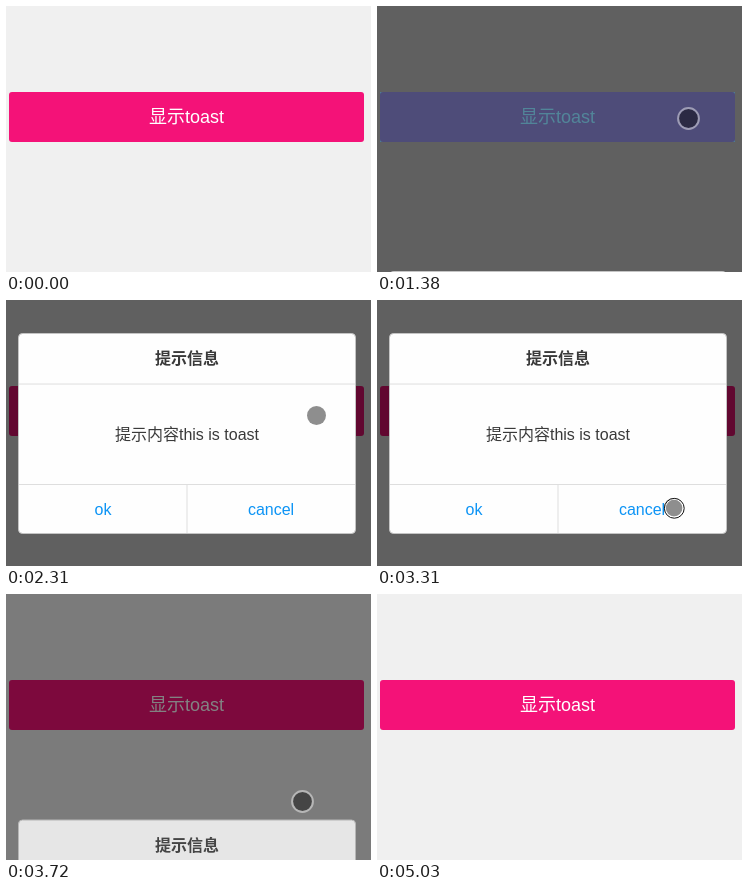
Animation, 365 px wide and 266 px high, one loop 5460 ms. Source, as an HTML page:

```html
<!DOCTYPE html>
<html lang="zh-CN">
<head>
<meta charset="utf-8">
<style>
  html, body { margin: 0; width: 100%; height: 100%; overflow: hidden; background: #f0f0f0; }
  svg { display: block; width: 365px; height: 266px; }
  text { font: 16px "Liberation Sans", "Noto Sans CJK SC", "Noto Sans CJK", sans-serif; text-anchor: middle; fill: #3a3a3a; }
  .label { font-size: 18px; fill: #fff; }
  .title { font-weight: 700; }
  .action { fill: #0d94f5; }
  .tap { fill: rgba(51, 181, 229, .4); }
</style>
</head>
<body>
<svg viewBox="0 0 365 266">
  <rect x="3" y="86" width="355" height="50" rx="3" fill="#f41278"/>
  <text class="label" x="180.5" y="117">显示toast</text>

  <rect id="mask" width="365" height="266" fill="rgba(0,0,0,.6)"/>
  <rect id="buttonTap" class="tap" x="3" y="86" width="355" height="50"/>

  <g id="dialog">
    <rect x="12.5" y="33.5" width="337" height="200" rx="4" fill="#fefefe" stroke="#c4c4c4"/>
    <path d="M13 84H349M13 184.5H349M181 184V233" stroke="#dedede" fill="none"/>
    <text class="title" x="181" y="64">提示信息</text>
    <text x="181" y="140">提示内容this is toast</text>
    <text class="action" x="97" y="215">ok</text>
    <text class="action" x="265" y="215">cancel</text>
    <rect id="cancelTap" class="tap" x="181" y="185" width="168" height="48"/>
  </g>

  <g id="pointer">
    <circle r="9.5" fill="rgba(0,0,0,.44)"/>
    <g id="press" fill="none">
      <circle cx=".6" cy=".6" r="9" stroke="#fff" stroke-width="1.4"/>
      <circle cx=".8" cy=".8" r="9.9" stroke="#111"/>
    </g>
    <circle id="halo" r="10.4" fill="none" stroke="rgba(255,255,255,.45)" stroke-width="2"/>
  </g>
</svg>
<script>
const LOOP = 5460;
const el = id => document.getElementById(id);
const show = (id, on) => el(id).setAttribute('visibility', on ? 'inherit' : 'hidden');

// Each track holds stepped states, led by their start time in ms.
const pointerTrack = [
  [0], [740, 356, 118.5], [860, 325, 114], [990, 311.5, 112.5],
  [2310, 310.5, 115.5], [2430, 309.5, 130], [2550, 308, 152], [2670, 306, 178],
  [2790, 303.5, 197.5], [2910, 299.5, 204.5], [3030, 296.5, 207.5],
  [4390, 299.5, 226.5], [4540, 303, 221], [4660, 304.5, 218.5], [4910, 310.5, 219.5], [5030]
];
// time, dialog offset, opacity
const popupTrack = [
  [0, 232, 0], [1380, 232, 1], [1500, 45, 1], [1620, 0, 1],
  [3450, 10, 1], [3570, 88, 1], [3720, 192.5, .82], [3840, 232, .3], [3960, 232, 0]
];
const ringTrack = [
  [0], [1240, 'press'], [1380, 'halo'], [1620],
  [3310, 'press'], [3450, 'halo'], [3840]
];

const stateAt = (track, t) => track.filter(step => step[0] <= t).pop();
const within = (t, from, to) => t >= from && t < to;

function draw(now) {
  const t = now % LOOP;
  const [, x, y] = stateAt(pointerTrack, t);
  const [, offset, opacity] = stateAt(popupTrack, t);
  const [, ring] = stateAt(ringTrack, t);

  el('mask').setAttribute('opacity', opacity);
  el('dialog').setAttribute('opacity', opacity);
  el('dialog').setAttribute('transform', `translate(0 ${offset})`);
  show('buttonTap', within(t, 1380, 1500));
  show('cancelTap', within(t, 3450, 3570));

  show('pointer', x !== undefined);
  if (x !== undefined) el('pointer').setAttribute('transform', `translate(${x} ${y})`);
  show('press', ring === 'press');
  show('halo', ring === 'halo');
}

const start = performance.now();
function tick() {
  draw(performance.now() - start);
  requestAnimationFrame(tick);
}
tick();
</script>
</body>
</html>
```
